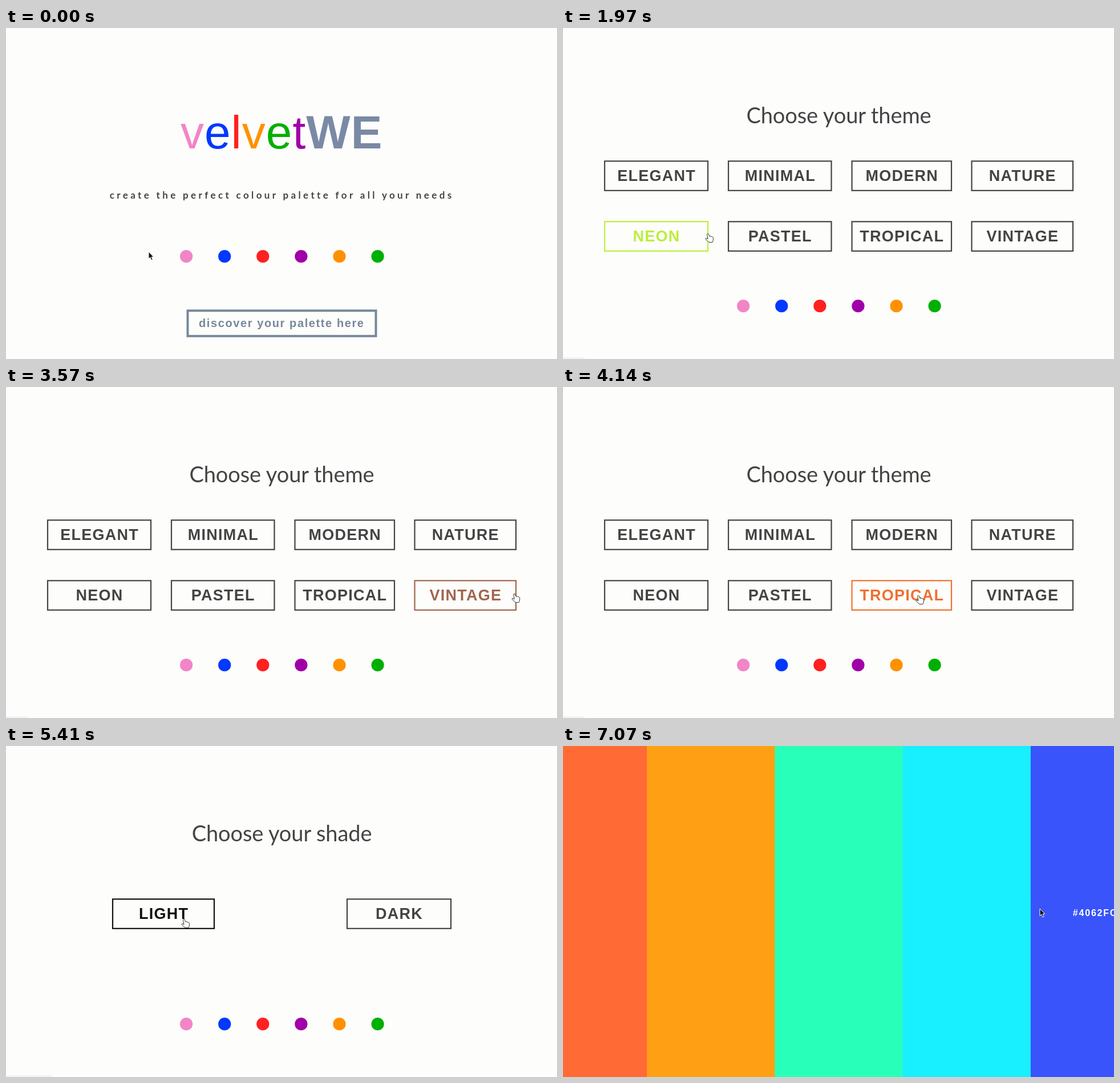
An HTML page that plays this animation: 966 px wide and 580 px high, repeating every 7100 ms.

```html
<!DOCTYPE html>
<html lang="en">
<head>
<meta charset="utf-8">
<title>Palette picker</title>
<style>
  html, body { margin: 0; width: 100%; height: 100%; overflow: hidden; background: #fdfdfc; }
  svg { display: block; width: 966px; height: 580px; }
  text { font-family: "Liberation Sans", Arial, sans-serif; font-weight: 700; white-space: pre; }
  .heading { font: 400 38px Lato, "Open Sans", sans-serif; letter-spacing: -.1px; fill: #444; text-anchor: middle; }
  .tagline { font: 700 17px Lato, "Open Sans", sans-serif; letter-spacing: 4.35px; fill: #444; }
  .brand { font-size: 82px; letter-spacing: 1px; }
  .start { font-size: 20px; letter-spacing: 1.6px; fill: #778899; }
  .label { font-size: 27px; letter-spacing: 1.25px; text-anchor: middle; }
  .hex { font-size: 16px; letter-spacing: 1.8px; fill: #fff; text-anchor: middle; }
</style>
</head>
<body>
<svg id="stage" viewBox="0 0 966 580"></svg>
<script>
const LOOP = 7100;
const INK = '#444';
const stage = document.getElementById('stage');

function add(parent, tag, attrs = {}, content = '') {
  const node = document.createElementNS('http://www.w3.org/2000/svg', tag);
  for (const key in attrs) node.setAttribute(key, attrs[key]);
  node.textContent = content;
  parent.appendChild(node);
  return node;
}

const show = (node, on) => node.setAttribute('visibility', on ? 'visible' : 'hidden');

function addDots(page, cy) {
  ['#f285c6', '#0038ff', '#ff2020', '#a000a8', '#ff9100', '#00b000'].forEach((fill, i) =>
    add(page, 'circle', { cx: 316.1 + 67.1 * i, cy, r: 11.1, fill }));
}

function addButton(page, name, left, right, top, hoverColor) {
  const frame = add(page, 'rect', {
    x: left, y: top, width: right - left, height: 51.5, fill: 'none', 'stroke-width': 2.2
  });
  const label = add(page, 'text', { class: 'label', x: (left + right) / 2 + .6, y: top + 34.7 }, name);
  const edge = 2;
  return {
    left: left - edge, right: right + edge, top: top - edge, bottom: top + 51.5 + edge,
    paint(on) {
      frame.setAttribute('stroke', on ? hoverColor : INK);
      label.setAttribute('fill', on ? hoverColor : INK);
    }
  };
}

// Landing page
const home = add(stage, 'g');
const brand = add(home, 'text', { class: 'brand', x: 306, y: 211 });
const brandColors = ['#f285c6', '#0038ff', '#ff2020', '#ff9100', '#00b000', '#a000a8'];
[...'velvet'].forEach((letter, i) =>
  add(brand, 'tspan', { fill: brandColors[i], 'font-weight': 400 }, letter));
add(brand, 'tspan', { fill: '#7a89a5' }, 'WE');
add(home, 'text', { class: 'tagline', x: 181.8, y: 299 },
  'create the perfect colour palette for all your needs');
addDots(home, 400.2);
add(home, 'rect', { x: 318.5, y: 495.3, width: 330, height: 44.5, fill: 'none', stroke: '#778899', 'stroke-width': 4 });
add(home, 'text', { class: 'start', x: 338, y: 524 }, 'discover your palette here');
const startButton = { left: 317, right: 650, top: 493, bottom: 541, paint() {} };

// Theme page
const theme = add(stage, 'g');
add(theme, 'text', { class: 'heading', x: 483.5, y: 167 }, 'Choose your theme');
const columns = [[73, 254], [290, 470.5], [506.5, 681], [716.5, 894]];
const themeButtons = [
  ['ELEGANT', '#b08d57'], ['MINIMAL', '#9a9a9a'], ['MODERN', '#3f7fc4'], ['NATURE', '#4f9d55'],
  ['NEON', '#bdee3c'], ['PASTEL', '#f2a6c4'], ['TROPICAL', '#f0702f'], ['VINTAGE', '#a0664e']
].map(([name, color], i) =>
  addButton(theme, name, ...columns[i % 4], i < 4 ? 233.3 : 339.3, color));
addDots(theme, 487.2);

// Shade page
const shade = add(stage, 'g');
add(shade, 'text', { class: 'heading', x: 483.5, y: 167 }, 'Choose your shade');
const shadeButtons = [
  addButton(shade, 'LIGHT', 187, 365, 268.3, '#111'),
  addButton(shade, 'DARK', 598, 780, 268.3, '#111')
];
addDots(shade, 487.2);

// Palette page: five centred columns, wider than the stage
const palette = add(stage, 'g');
const COLUMN = 224.3;
const FIRST = 483.5 - COLUMN * 2.5;
const swatches = [
  ['#ff6a35', '#FF6B35'], ['#ffa014', '#FFA015'], ['#28ffb9', '#29FFB8'],
  ['#18f0ff', '#1CEFFF'], ['#3854fa', '#4062FC']
].map(([fill, code], i) => {
  const left = FIRST + COLUMN * i;
  add(palette, 'rect', { x: left, y: 0, width: COLUMN + 1, height: 580, fill });
  const label = add(palette, 'text', { class: 'hex', x: left + COLUMN / 2 + .9, y: 298 }, code);
  return {
    left, right: left + COLUMN, top: 0, bottom: 580,
    paint(on) { show(label, on); }
  };
});

const status = add(stage, 'rect', { x: 0, y: 577, height: 3, fill: '#f3f3f3' });
const cursor = add(stage, 'g');
const arrow = add(cursor, 'path', {
  d: 'M0 0V12.5L2.8 10L5 15L7.2 14L5.1 9.2H8.8Z',
  fill: '#111', stroke: '#fff', 'stroke-width': 1
});
const hand = add(cursor, 'path', {
  d: 'M-1.6 1.2Q-.6-.4 1 .8L2.8 5.2L4 4.8Q5.2 4.6 5.8 5.6Q7 5 7.8 6.2Q9.2 6 9.4 7.6V11Q9 13 8 15.5H2L-3.6 10.4Q-5 8.6-3.4 8.2L0 9.6Z',
  fill: '#fff', stroke: '#333', 'stroke-width': 1
});

const pages = [
  { from: 0, node: home, targets: [startButton], strip: 0 },
  { from: 570, node: theme, targets: themeButtons, strip: 38 },
  { from: 4290, node: shade, targets: shadeButtons, strip: 80 },
  { from: 5680, node: palette, targets: swatches, strip: 0 }
];

// Cursor stops: time, x, y
const stops = [
  [0, 250, 392], [30, 250, 392], [400, 428, 518], [1000, 432, 524],
  [1270, 165, 262], [1600, 800, 262], [1880, 180, 366], [1970, 254, 360],
  [3000, 641, 354], [3600, 893, 362], [4140, 623, 365], [4300, 623, 365],
  [4700, 690, 295], [5150, 280, 292], [5410, 312, 303], [5700, 312, 303],
  [6350, 40, 298], [6580, 130, 292], [7070, 836, 285], [LOOP, 836, 285]
];

function cursorAt(time) {
  const next = stops.findIndex(stop => stop[0] > time);
  const [t0, x0, y0] = stops[next - 1];
  const [t1, x1, y1] = stops[next];
  const u = (time - t0) / (t1 - t0);
  const eased = u * u * (3 - 2 * u);
  return [x0 + (x1 - x0) * eased, y0 + (y1 - y0) * eased];
}

function render(time) {
  const page = pages.filter(p => p.from <= time).pop();
  const [x, y] = cursorAt(time);
  const contains = b => x >= b.left && x < b.right && y >= b.top && y < b.bottom;

  pages.forEach(p => p.node.setAttribute('display', p === page ? 'inline' : 'none'));
  page.targets.forEach(target => target.paint(contains(target)));

  const pointing = page.node !== palette && page.targets.some(contains);
  show(hand, pointing);
  show(arrow, !pointing);
  cursor.setAttribute('transform', `translate(${x.toFixed(2)} ${y.toFixed(2)})`);
  status.setAttribute('width', time > 1200 ? page.strip : 0);
}

const began = performance.now();
function tick() {
  render((performance.now() - began) % LOOP);
  requestAnimationFrame(tick);
}
tick();
</script>
</body>
</html>
```
